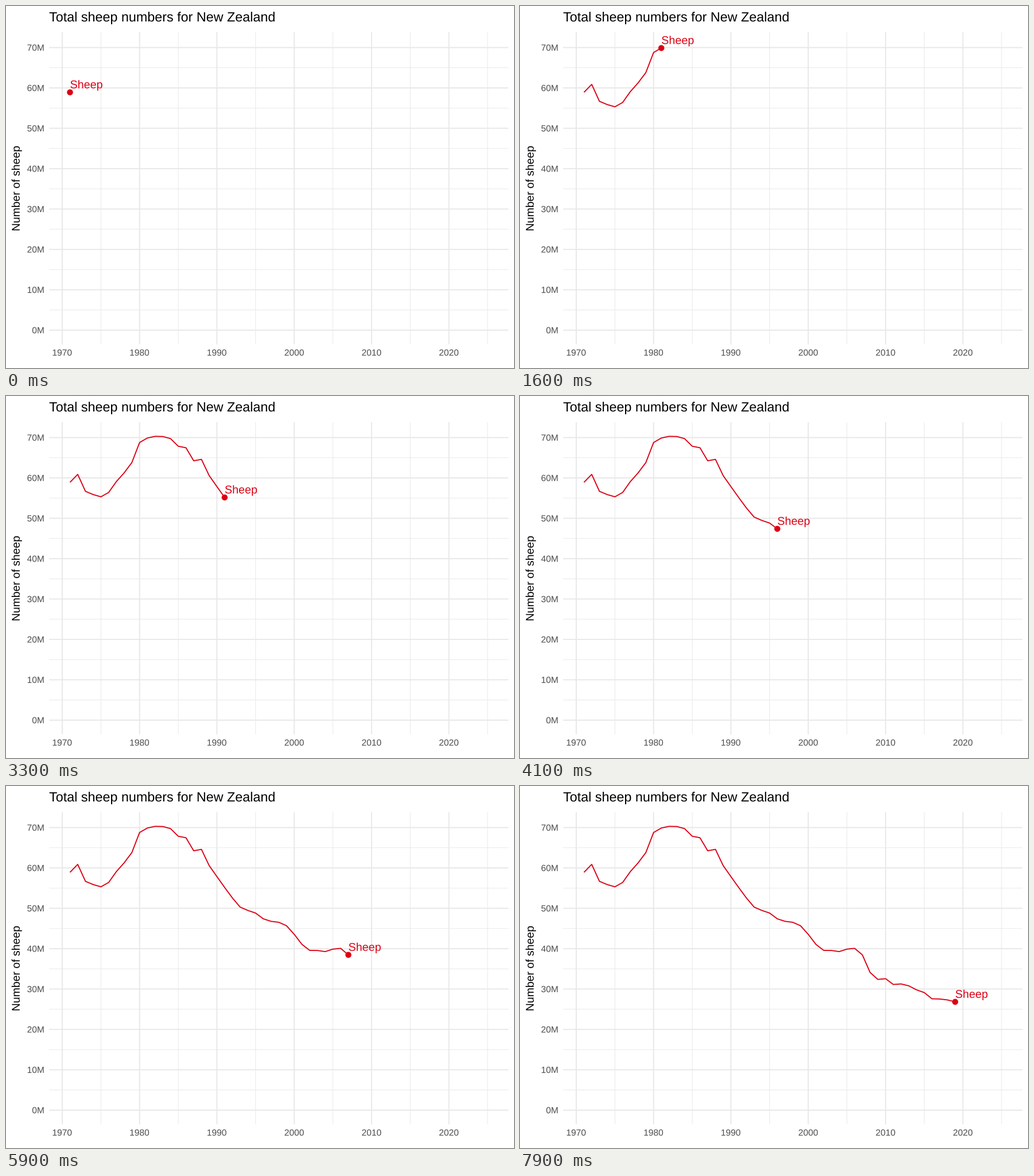
Recreate the animation shown at these times as a matplotlib script. Size 885 by 632 pixels, loop 10 s.

```python
import numpy as np
import matplotlib.pyplot as plt
from matplotlib.animation import FuncAnimation
from matplotlib.patches import Circle, PathPatch
from matplotlib.textpath import TextPath
from matplotlib.transforms import Affine2D

WIDTH, HEIGHT, DPI = 885, 632, 100
FRAMES, INTERVAL, LAST_MOVE = 100, 100, 79
PX = 72 / DPI  # points per pixel
RED, GRID, TICK = "#DC0014", "#E8E8E8", "#4D4D4D"

# Millions of sheep, one value per year from 1971
SHEEP = np.array([
    58.91, 60.88, 56.68, 55.88, 55.32, 56.40, 59.10, 61.25, 63.80, 68.77,
    69.88, 70.30, 70.26, 69.74, 67.85, 67.47, 64.24, 64.60, 60.57, 57.85,
    55.16, 52.57, 50.30, 49.47, 48.82, 47.39, 46.77, 46.53, 45.68, 43.55,
    41.05, 39.57, 39.55, 39.27, 39.88, 40.08, 38.46, 34.09, 32.38, 32.56,
    31.13, 31.26, 30.79, 29.80, 29.12, 27.58, 27.53, 27.30, 26.82])
YEARS = 1971 + np.arange(len(SHEEP))
# Each year is reached on a whole frame; motion is linear in between
KEYS = np.round(np.arange(len(SHEEP)) * LAST_MOVE / (len(SHEEP) - 1))


def year_x(year):
    return 98 + 13.472 * (year - 1970)


def sheep_y(millions):
    return 565.9 - 7.048 * millions


LEFT, RIGHT = year_x(1968.3), year_x(2027.7)
BOTTOM, TOP = sheep_y(-3.515), sheep_y(73.815)

fig = plt.figure(figsize=(WIDTH / DPI, HEIGHT / DPI), dpi=DPI, facecolor="white")
ax = fig.add_axes([0, 0, 1, 1])
ax.set(xlim=(0, WIDTH), ylim=(HEIGHT, 0))
ax.axis("off")


def placed(x, y, angle=0):
    return Affine2D().scale(1, -1).rotate_deg(-angle).translate(x, y) + ax.transData


def add_text(text, x, baseline, size, color="black", align=0, angle=0):
    """Draw text; align None keeps the pen origin, 0.5 centres, 1 right-aligns."""
    path = TextPath((0, 0), text, size=size, prop={"family": "Liberation Sans"})
    if align:
        box = path.get_extents()
        path = path.transformed(
            Affine2D().translate(-(box.x0 + align * box.width), 0))
    patch = PathPatch(path, facecolor=color, linewidth=0, zorder=5,
                      transform=placed(x, baseline, angle))
    return ax.add_patch(patch)


def add_grid(years, millions, width):
    style = dict(color=GRID, lw=width * PX, snap=False, zorder=1,
                 solid_capstyle="butt")
    for m in millions:
        ax.plot([LEFT, RIGHT], [sheep_y(m)] * 2, **style)
    for year in years:
        ax.plot([year_x(year)] * 2, [TOP, BOTTOM], **style)


add_grid(range(1975, 2026, 10), range(5, 70, 10), 0.95)
add_grid(range(1970, 2021, 10), range(0, 71, 10), 1.89)

for m in range(0, 71, 10):
    add_text(f"{m}M", 65.6, sheep_y(m) + 5.5, 15.56, TICK, align=1)
for year in range(1970, 2021, 10):
    add_text(str(year), year_x(year), 610.4, 15.56, TICK, align=0.5)
add_text("Total sheep numbers for New Zealand", LEFT, 27, 23.33)
add_text("Number of sheep", 23.8, 318.2, 19.44, align=0.5, angle=90)

line, = ax.plot([], [], color=RED, lw=1.88 * PX, snap=False, zorder=3,
                solid_capstyle="butt", solid_joinstyle="round")
dot = ax.add_patch(Circle((0, 0), 5.25, facecolor=RED, linewidth=0, zorder=4))
label = add_text("Sheep", 0, 0, 19.76, RED)


def update(frame):
    year = np.interp(frame, KEYS, YEARS)
    count = np.interp(year, YEARS, SHEEP)
    passed = YEARS < year
    x, y = year_x(year), sheep_y(count)
    line.set_data(np.append(year_x(YEARS[passed]), x),
                  np.append(sheep_y(SHEEP[passed]), y))
    dot.center = x, y
    label.set_transform(placed(x, y - 7))
    return line, dot, label


anim = FuncAnimation(fig, update, frames=FRAMES, interval=INTERVAL,
                     init_func=lambda: update(0), repeat=True)
plt.show()
```
